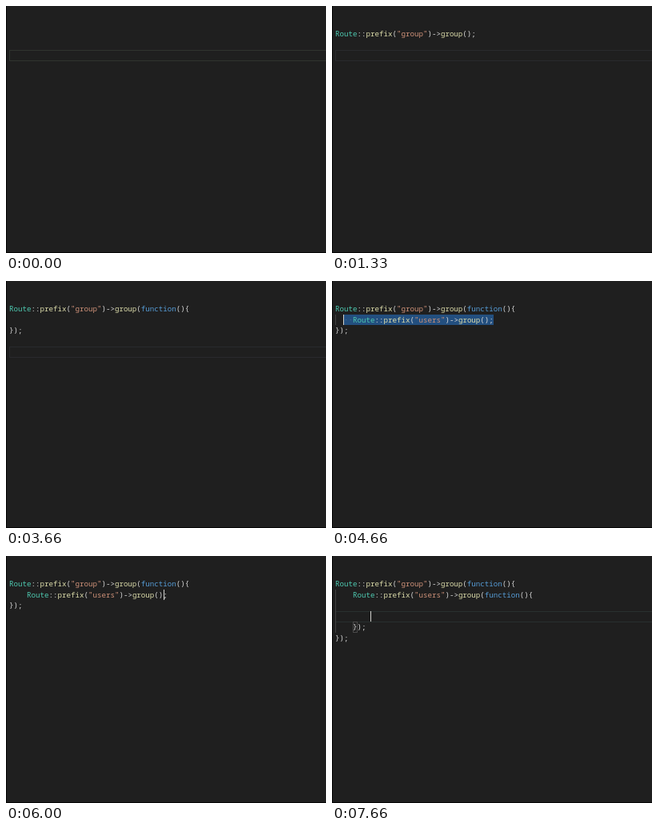
Write an HTML page that moves like this. It is 400x309 px and loops after 8 s.

```html
<!DOCTYPE html>
<html lang="en">
<head>
<meta charset="utf-8">
<title>Route groups</title>
<style>
  html, body { margin: 0; width: 100%; height: 100%; overflow: hidden; background: #1f1f1f; }
  #stage {
    position: relative; width: 400px; height: 309px; overflow: hidden; box-sizing: border-box;
    background: #1f1f1f; border-left: 1px solid #050505; border-bottom: 1px solid #050505;
  }
  #view { position: absolute; left: -1px; top: 0; width: 400px; height: 309px; }
  #view > * { position: absolute; box-sizing: border-box; }
  .line {
    left: 4px; white-space: pre; color: #d8d8d8;
    font: 9.1667px/13.5px "Noto Sans Mono", "DejaVu Sans Mono", monospace;
    font-variant-ligatures: none;
  }
  .type { color: #4ec9b0; }
  .call { color: #dcdcaa; }
  .text { color: #ce9178; }
  .key { color: #569cd6; }
  .dots { color: #47729a; }
  .sel { background: #234f7f; }
  .caret { width: 1px; background: #d0d0cc; }
  .guide { width: 1px; background: #414141; }
  .match { border: 1px solid #4a4a4a; }
  .row { width: 396px; height: 14px; left: 4px; border: 1px solid; border-right: 0; }
</style>
</head>
<body>
<div id="stage"><div id="view"></div></div>
<script>
const LOOP = 8000, LEFT = 4, TOP = 28.3, CHAR = 5.5, ROW = 13.5;
const view = document.getElementById("view");

const span = (kind, text) => `<span class="${kind}">${text}</span>`;
const head = name => span("type", "Route") + "::" + span("call", "prefix") + "(" +
  span("text", `"${name}"`) + ")-&gt;" + span("call", "group") + "(";
const fn = span("key", "function") + "(){";
const pad = "    ", dots = span("dots", "··");

const single = [head("group") + ");"];
const nest = (...inner) => [head("group") + fn, ...inner, "});"];
const users = pad + head("users") + ");";
const full = nest(pad + head("users") + fn, "", "", pad + "});");

// sel: [row, column, width in characters]; caret and match: [row, column]
const steps = [
  { at: 0, row: 2, tint: "#30342f" },
  { at: 330, code: single, sel: [[0, 0, 32]], caret: [0, 0], row: 2, tint: "#30342f" },
  { at: 1000, code: single, row: 2, caret: [2, 0] },
  { at: 1330, code: single, row: 2 },
  { at: 2000, code: single, caret: [0, 30], match: [[0, 29], [0, 30]] },
  { at: 2660, code: nest(dots), sel: [[0, 30, 12], [1, 0, 3], [2, 0, 1]], caret: [0, 30] },
  { at: 3000, code: nest(""), row: 4, caret: [4, 0] },
  { at: 3330, code: nest(""), row: 4 },
  { at: 4000, code: nest(""), caret: [0, 41], match: [[0, 40], [2, 0]] },
  { at: 4660, code: nest("  " + dots + users.slice(4)), sel: [[1, 1.9, 34.1]], caret: [1, 1.9], guide: [1, 1] },
  { at: 5000, code: nest(users), row: 4, caret: [4, 0] },
  { at: 5330, code: nest(users), row: 4 },
  { at: 6000, code: nest(users), caret: [1, 35] },
  { at: 7330, code: full, row: 3, tint: "#29302f", caret: [3, 8], match: [[4, 4]], guide: [1, 4] }
];

function add(kind, left, top, width, height) {
  const el = document.createElement("div");
  el.className = kind;
  el.style.left = left + "px";
  el.style.top = top + "px";
  if (width) el.style.width = width + "px";
  if (height) el.style.height = height + "px";
  view.append(el);
  return el;
}

const colX = c => Math.round(LEFT + c * CHAR);
const rowY = r => Math.round(28 + r * ROW);
const rowH = r => rowY(r + 1) - rowY(r);

function draw({ code = [], sel = [], match = [], caret, row, guide, tint = "#292a2d" }) {
  view.replaceChildren();
  if (row !== undefined) add("row", LEFT, rowY(row) - (row === 3 ? 0 : 0)).style.borderColor = tint;
  for (const [r, c, n] of sel) add("sel", colX(c), rowY(r), Math.round(n * CHAR), rowH(r));
  if (guide) add("guide", LEFT, rowY(guide[0]), 1, rowY(guide[0] + guide[1]) - rowY(guide[0]));
  for (const [r, c] of match) add("match", colX(c), rowY(r), 6, rowH(r));
  code.forEach((html, r) => { add("line", LEFT, TOP + r * ROW).innerHTML = html; });
  if (caret) add("caret", colX(caret[1]), rowY(caret[0]), 1, rowH(caret[0]));
}

let shown;
function tick() {
  const t = performance.now() % LOOP;
  const step = steps.findLast(s => s.at <= t);
  if (step !== shown) draw(shown = step);
  requestAnimationFrame(tick);
}
tick();
</script>
</body>
</html>
```
